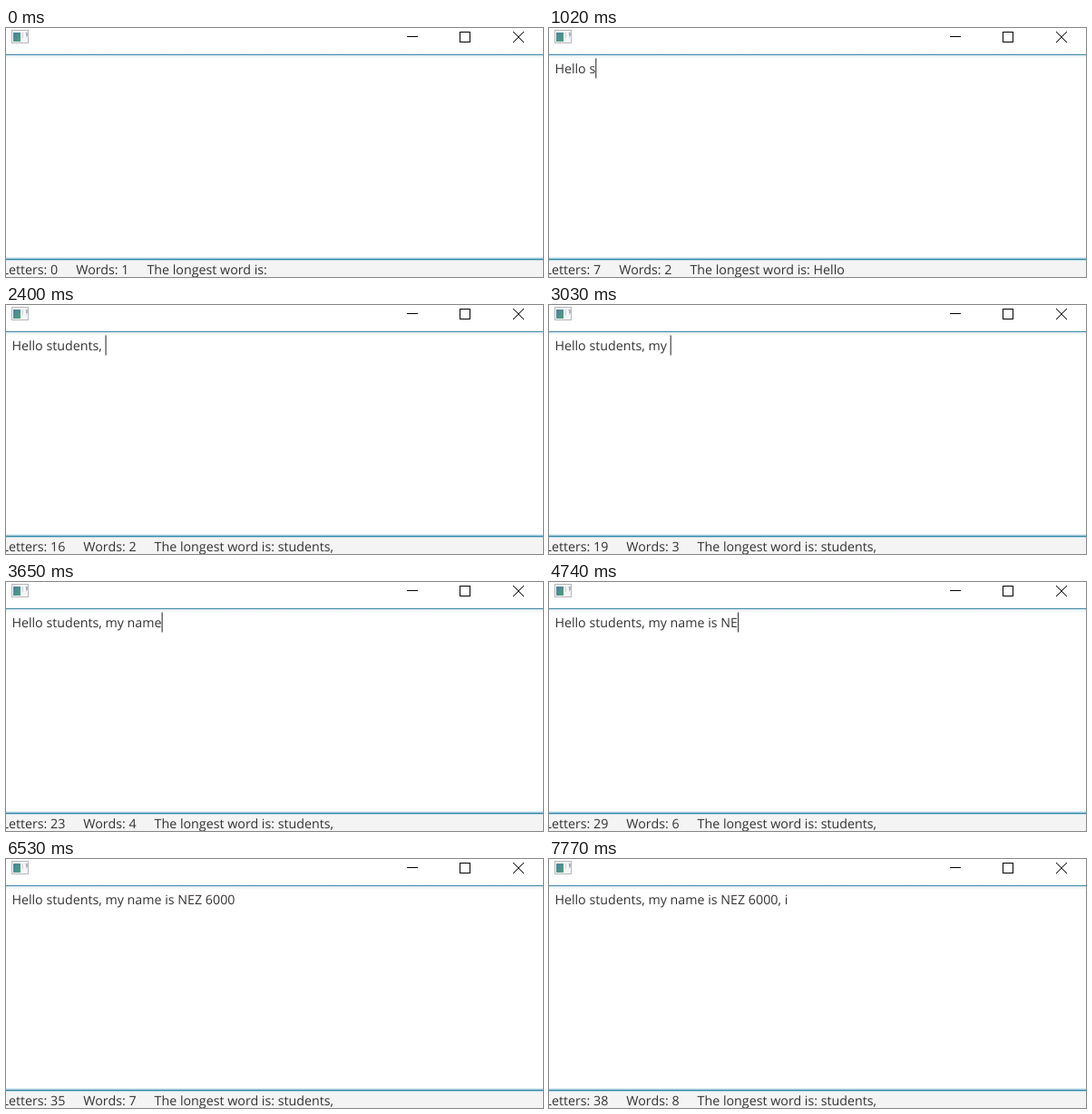
Write an HTML page that moves like this. It is 592 px wide and 275 px high and loops after 8000 ms.

```html
<!DOCTYPE html>
<html lang="en">
<head>
<meta charset="utf-8">
<title>Word counter</title>
<style>
  html, body { margin: 0; width: 100%; height: 100%; overflow: hidden; background: #fff; }
  svg { display: block; }
  text {
    font: 14.25px "Open Sans", "Noto Sans", sans-serif;
    fill: #333;
    white-space: pre;
    text-rendering: geometricPrecision;
  }
</style>
</head>
<body>
<svg width="592" height="275" viewBox="0 0 592 275">
  <defs>
    <linearGradient id="pane" x2="1" y2="1">
      <stop stop-color="#4d7fa0"/>
      <stop offset="1" stop-color="#4fa27c"/>
    </linearGradient>
    <linearGradient id="shade" x2="0" y2="1">
      <stop stop-color="#e3ebef"/>
      <stop offset="1" stop-color="#fff"/>
    </linearGradient>
  </defs>
  <rect width="592" height="275" fill="#fff"/>

  <!-- title bar -->
  <rect x="6.5" y="2.5" width="18" height="14" fill="#f6f6f8" stroke="#b4b7be"/>
  <rect x="8" y="5" width="8" height="10" fill="url(#pane)"/>
  <path d="M18.5 5v6M21 5.5h2M22.5 5v6" stroke="#d3d5da" fill="none"/>
  <path d="M23 5v4" stroke="#7d828c"/>
  <g fill="none" stroke="#000">
    <path d="M442 9.5h12"/>
    <rect x="500.5" y="4.5" width="11" height="11"/>
    <path d="M559 4l12 12M571 4l-12 12"/>
  </g>

  <!-- text area and status bar -->
  <rect y="29" width="592" height="1" fill="#3f8aa8"/>
  <rect y="30" width="592" height="4" fill="url(#shade)"/>
  <rect y="253" width="592" height="2" fill="#dcebf1"/>
  <rect y="256" width="592" height="19" fill="#f4f4f4"/>
  <rect y="254.7" width="592" height="1.6" fill="#2f8aaa"/>

  <text id="typed" x="6.4" y="50" xml:space="preserve"></text>
  <rect id="caret" y="33.5" width="1.1" height="22" fill="#333"/>
  <text id="letters" x="-4.5" y="272" xml:space="preserve"></text>
  <text id="words" y="272" xml:space="preserve"></text>
  <text id="longest" y="272" xml:space="preserve"></text>
</svg>
<script>
const LOOP = 8000, BLINK = 480, GAP = 20, TEXT_X = 6.4;
const [typed, caret, letters, words, longest] =
  ["typed", "caret", "letters", "words", "longest"].map(id => document.getElementById(id));

// Bursts of typing: first key, last key, text pieces spread evenly between them
const bursts = [
  [150, 1020, [..."Hello s"]],
  [1250, 2170, [..."tudents,"]],
  [2400, 2400, [" "]],
  [2800, 3030, [..."my "]],
  [3420, 3650, ["n", "am", "e"]],
  [3800, 4050, [..." is "]],
  [4430, 4430, ["N"]],
  [4740, 5120, [..."EZ "]],
  [5580, 6050, [..."6000"]],
  [6830, 6910, [...", "]],
  [7220, 7220, ["i"]]
];
const keys = bursts.flatMap(([from, to, pieces]) => pieces.map((piece, i) => ({
  time: from + (to - from) * i / Math.max(1, pieces.length - 1),
  piece
})));

const endOf = (node, x) => x + node.getComputedTextLength();

function place(node, x, content) {
  node.textContent = content;
  node.setAttribute("x", x);
  return endOf(node, x) + GAP;
}

function render(t) {
  const pressed = keys.filter(key => key.time <= t + 0.01);
  const text = pressed.map(key => key.piece).join("");
  const parts = text.trimEnd().split(" ");
  const best = parts.reduce((a, b) => b.length > a.length ? b : a);

  typed.textContent = text;
  let x = place(letters, -4.5, "Letters: " + text.length);
  x = place(words, x, "Words: " + parts.length);
  place(longest, x, "The longest word is: " + best);

  const last = pressed.at(-1);
  const shown = last && t - last.time < BLINK;
  caret.setAttribute("visibility", shown ? "visible" : "hidden");
  caret.setAttribute("x", text ? endOf(typed, TEXT_X) : TEXT_X);
}

const start = performance.now();
function tick() {
  render((performance.now() - start) % LOOP);
  requestAnimationFrame(tick);
}
tick();
</script>
</body>
</html>
```
